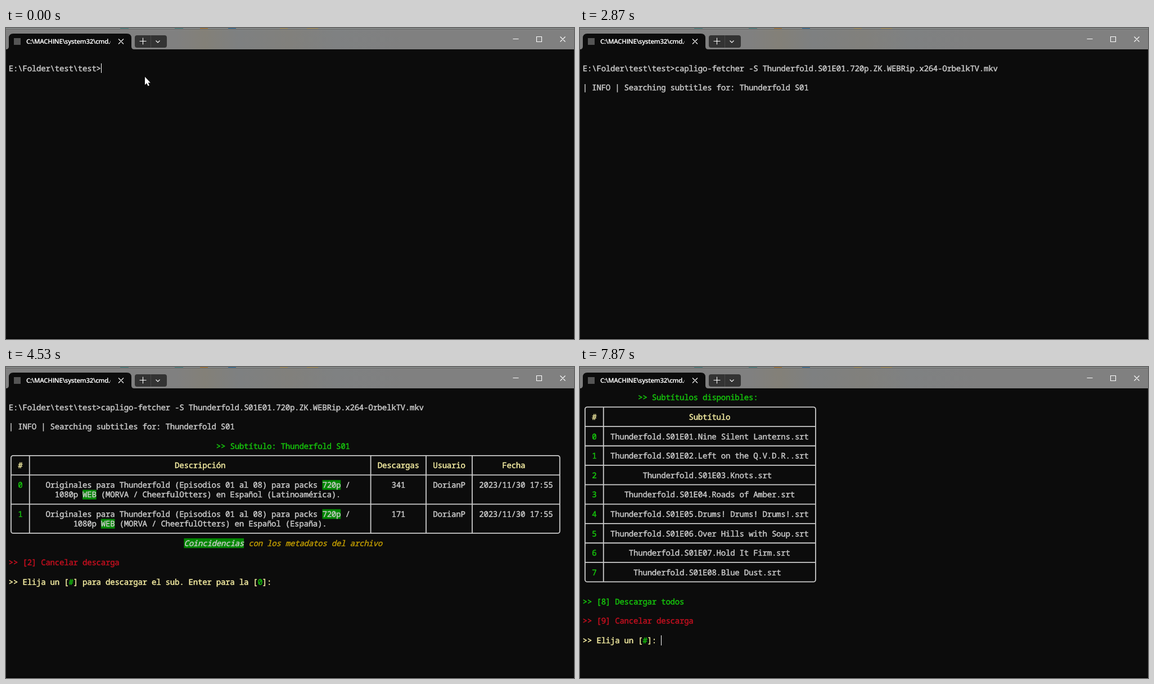
Recreate the animation shown at these times as an HTML page. Size 1010 by 554 pixels, loop 8 s.

```html
<!DOCTYPE html>
<html lang="es">
<head>
<meta charset="utf-8">
<title>Terminal</title>
<style>
html, body { margin: 0; width: 100%; height: 100%; overflow: hidden; background: #0c0c0c; }
svg { display: block; width: 1010px; height: 554px; }
text { white-space: pre; text-rendering: geometricPrecision; fill: currentColor; stroke: currentColor; }
#screen text { font: 14.1px "Noto Sans Mono", monospace; letter-spacing: -.26px; stroke-width: .45; }
#screen { color: #ccc; }
.green { color: #16c60c; }
.yellow { color: #f9f1a5; }
.red { color: #c50f1f; }
.gold { color: #c19c00; }
#screen .slant { font-style: italic; }
.mark { fill: #008700; }
.grid { fill: none; stroke: #ccc; stroke-width: 1.8; }
.title { font: 600 11.4px "Open Sans", sans-serif; letter-spacing: -.25px; color: #fff; stroke-width: .2; }
.icon { fill: none; stroke: #fff; stroke-width: 1.1; }
</style>
</head>
<body>
<svg viewBox="0 0 1010 554">
  <defs>
    <linearGradient id="bar">
      <stop offset="0" stop-color="#808080"/>
      <stop offset=".3" stop-color="#808080"/>
      <stop offset=".35" stop-color="#838078"/>
      <stop offset=".41" stop-color="#7e8081"/>
      <stop offset=".5" stop-color="#81807c"/>
      <stop offset=".58" stop-color="#7f8182"/>
      <stop offset=".7" stop-color="#808080"/>
      <stop offset="1" stop-color="#808080"/>
    </linearGradient>
    <clipPath id="tab"><path d="M36 12h150v24h-150z"/></clipPath>
  </defs>
  <path fill="#0c0c0c" d="M0 0h1010v554H0z"/>
  <path fill="url(#bar)" d="M0 0h1010v38H0z"/>
  <path fill="#a4aaa9" d="M0 0h1010v1H0z"/>
  <path fill="#5c5c5c" d="M0 1h1010v1H0z"/>
  <path fill="#4d9a99" d="M203 0h15v1h-15zM300 0h15v1h-15z"/>
  <path fill="#d08a2c" d="M345 0h14v1h-14z"/>
  <path fill="#2f7fb8" d="M395 0h14v1h-14z"/>
  <path fill="#cdb068" d="M487 0h14v1h-14zM535 0h20v1h-20z"/>

  <path fill="#0c0c0c" d="M0 38q5 0 5-5V18q0-8 8-8h202q8 0 8 8v15q0 5 5 5z"/>
  <path fill="#555" d="M14 18h12v12h-12z"/>
  <text class="title" x="36" y="28" clip-path="url(#tab)">C:\MACHINE\system32\cmd.exe</text>
  <rect x="229" y="13" width="57" height="22" rx="4" fill="#333"/>
  <path stroke="#484848" d="M257.5 13v22"/>
  <path class="icon" d="M200 19.5l9 9m0-9l-9 9M237.5 23.5h12m-6-6v12M266.5 22.5l3.5 3.5 3.5-3.5"/>
  <path class="icon" d="M901.5 19.5h10M943.5 15.5h9v9h-9zM985.5 15.5l9 9m0-9l-9 9"/>
  <path fill="#040404" d="M0 552h1010v2H0z"/>

  <g id="screen"></g>
  <rect id="cursor" width="1" fill="#fff"/>
  <path id="pointer" fill="#fff" d="M247 87v14.2l3.2-3 2.4 5 2.3-1-2.3-4.8h4.2z"/>
</svg>
<script>
const LOOP = 8000, CELL = 8.2, ROW = 17.3;
const colX = c => 4.85 + c * CELL;
const rowY = r => 63 + r * ROW;
const midX = c => colX(c + .5);
const midY = r => rowY(r + .48);

// Each run is [text, class]; class "mark" puts a green box behind the text.
function line(row, col, ...runs) {
  return runs.map(([str, cls = ""]) => {
    const x = colX(col);
    col += str.length;
    const box = cls.includes("mark")
      ? `<rect class="mark" x="${x}" y="${rowY(row)}" width="${str.length * CELL}" height="${ROW}"/>` : "";
    return `${box}<text class="${cls.replace("mark", "")}" x="${x}" y="${rowY(row) + 13.6}">${str}</text>`;
  }).join("");
}

function grid(rows, cols) {
  const left = midX(cols[0]), right = midX(cols.at(-1));
  const top = midY(rows[0]), bottom = midY(rows.at(-1));
  const inner = rows.slice(1, -1).map(r => `M${left} ${midY(r)}H${right}`)
    .concat(cols.slice(1, -1).map(c => `M${midX(c)} ${top}V${bottom}`)).join("");
  return `<rect class="grid" x="${left}" y="${top}" width="${right - left}" height="${bottom - top}" rx="4"/>
    <path class="grid" d="${inner}"/>`;
}

const show = "Thunderfold";

const result = (row, id, indent, count, region) =>
  line(row, 2, [id, "green"]) +
  line(row, 8, [`Originales para ${show} (Episodios 01 al 08) para packs `], ["720p", "mark"], [" /"]) +
  line(row + 1, indent, ["1080p "], ["WEB", "mark"], [` (MORVA / CheerfulOtters) en Español (${region}).`]) +
  line(row, 83, [count]) + line(row, 92, ["DorianP"]) + line(row, 102, ["2023/11/30 17:55"]);

const results =
  line(4, 45, [`>> Subtítulo: ${show} S01`, "green"]) +
  grid([5, 7, 10, 13], [0, 4, 78, 90, 100, 119]) +
  [[2, "#"], [36, "Descripción"], [80, "Descargas"], [92, "Usuario"], [107, "Fecha"]]
    .map(([c, s]) => line(6, c, [s, "yellow"])).join("") +
  result(8, "0", 10, "341", "Latinoamérica") +
  result(11, "1", 14, "171", "España") +
  line(14, 38, ["Coincidencias", "mark slant"], [" con los metadatos del archivo", "gold slant"]);

const question =
  line(16, 0, [">> [2] Cancelar descarga", "red"]) +
  line(18, 0, [">> Elija un [", "yellow"], ["#", "green"],
    ["] para descargar el sub. Enter para la [", "yellow"], ["0", "green"], ["]: ", "yellow"]);

const episodes = ["Nine Silent Lanterns", "Left on the Q.V.D.R.", "Knots", "Roads of Amber",
  "Drums! Drums! Drums!", "Over Hills with Soup", "Hold It Firm", "Blue Dust"];

const files =
  line(-1, 12, [">> Subtítulos disponibles:", "green"]) +
  grid([0, 2, 4, 6, 8, 10, 12, 14, 16, 18], [0, 4, 50]) +
  line(1, 2, ["#", "yellow"]) + line(1, 23, ["Subtítulo", "yellow"]) +
  episodes.map((name, i) => {
    const file = `${show}.S01E0${i + 1}.${name}.srt`;
    return line(3 + 2 * i, 2, [`${i}`, "green"]) +
      line(3 + 2 * i, 6 + Math.floor((43 - file.length) / 2), [file]);
  }).join("") +
  line(20, 0, [">> [8] Descargar todos", "green"]) +
  line(22, 0, [">> [9] Cancelar descarga", "red"]) +
  line(24, 0, [">> Elija un [", "yellow"], ["#", "green"], ["]: ", "yellow"]);

// [start, end, markup]
const LIST = 7870;
const layers = [
  [0, LIST, line(0, 0, ["E:\\Folder\\test\\test>"])],
  [200, LIST, line(0, 20, [`capligo-fetcher -S ${show}.S01E01.720p.ZK.WEBRip.x264-OrbelkTV.mkv`])],
  [2600, LIST, line(2, 0, [`| INFO | Searching subtitles for: ${show} S01`])],
  [3130, LIST, results],
  [3200, LIST, question],
  [6400, LIST, line(18, 58, ["1"])],
  [7130, LIST, line(20, 0, ["| INFO | Getting url from: https:\/\/www.example.com/418306"])],
  [LIST, LOOP, files]
];

// [start, column, row]; no position means the cursor is hidden
const cursorSteps = [
  [0, 20, 0], [200, 90, 0], [930], [1470, 90, 0], [1670, 0, 1], [2330],
  [2600, 0, 3], [2870], [3130, 0, 15], [3200, 58, 18], [3400], [3930, 58, 18],
  [4530], [5070, 58, 18], [5600], [6200, 58, 18], [6400, 59, 18],
  [7070, 0, 19], [7130, 0, 21], [7800], [LIST, 17, 24]
];

const screen = document.getElementById("screen");
const cursor = document.getElementById("cursor");
const pointer = document.getElementById("pointer");
screen.innerHTML = layers.map(layer => `<g>${layer[2]}</g>`).join("");
const groups = [...screen.children];
const toggle = (el, on) => el.style.display = on ? "" : "none";

function draw() {
  const t = performance.now() % LOOP;
  layers.forEach(([start, end], i) => toggle(groups[i], t >= start && t < end));
  toggle(pointer, t < 1670);
  const [, col, row] = cursorSteps.findLast(step => t >= step[0]);
  toggle(cursor, col !== undefined);
  if (col !== undefined) {
    const top = Math.round(rowY(row));
    cursor.setAttribute("x", Math.round(colX(col)));
    cursor.setAttribute("y", top);
    cursor.setAttribute("height", Math.round(rowY(row + 1)) - top);
  }
  requestAnimationFrame(draw);
}
draw();
</script>
</body>
</html>
```
